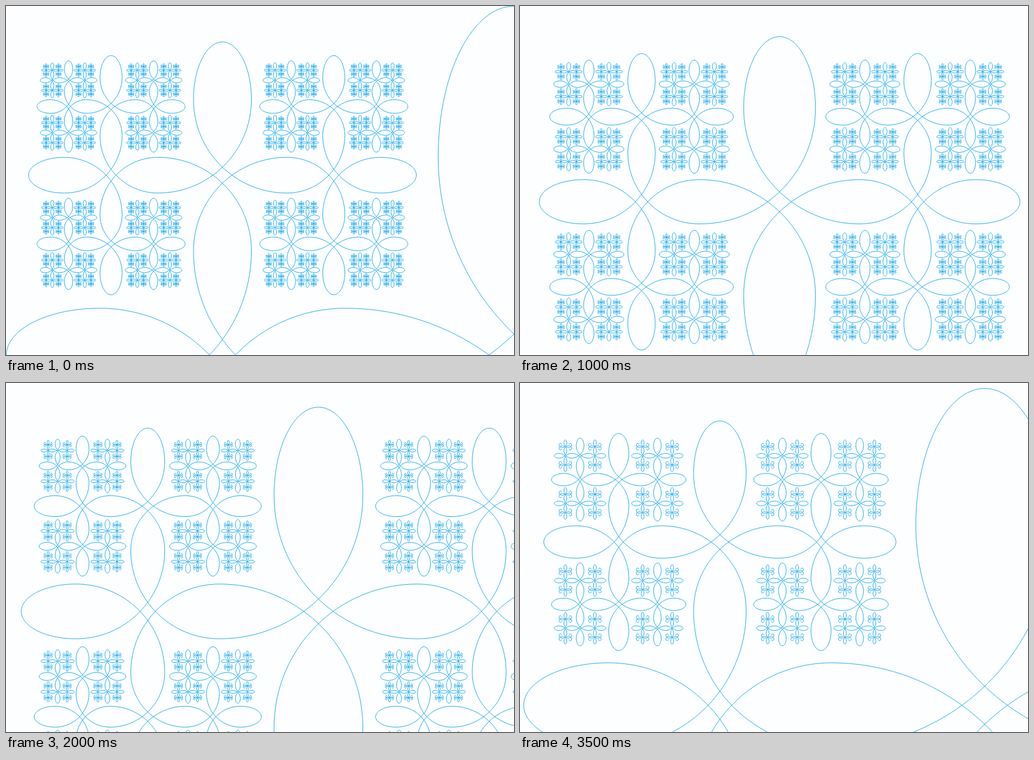
Animation, 902 px wide and 621 px high, one loop 3.75 s. Source, as an HTML page with a canvas:

```html
<!DOCTYPE html>
<html lang="en">
<head>
<meta charset="utf-8">
<title>Golden H-tree zoom</title>
<style>
  html, body { margin: 0; width: 100%; height: 100%; overflow: hidden; background: #fdfeff; }
  canvas { display: block; }
</style>
</head>
<body>
<canvas id="stage" width="902" height="621"></canvas>
<script>
const W = 902, H = 621;
const ctx = document.getElementById('stage').getContext('2d');

const PHI = (1 + Math.sqrt(5)) / 2;
const KAPPA = 0.5523;
const ROOT = { x: W, y: H, arm: 517.7 };
// The corner the branches converge on; the zoom keeps it in place.
const FOCUS = { x: ROOT.x - ROOT.arm * PHI, y: ROOT.y - ROOT.arm };
const DEPTH = 10;
const STEP = 250, STEPS = 15;

// Lobe proportions, relative to the arm length.
const WIDTH = 0.1607, INNER = 0.579, OUTER = 0.421, TIP = 0.741;

const tree = new Path2D();

// Quarter ellipses in a junction's own axes: u along its arms, v along its stem.
function pen(x, y, upright) {
  const at = (u, v) => upright ? [x + v, y + u] : [x + u, y + v];
  return (pu, pv, qu, qv) => {
    tree.moveTo(...at(pu, pv));
    tree.bezierCurveTo(
      ...at(pu + KAPPA * (qu - pu), pv),
      ...at(qu, qv + KAPPA * (pv - qv)),
      ...at(qu, qv));
  };
}

function junction(x, y, arm, upright, out, level) {
  if (x > W + 1 || y > H + 1) return;
  const quarter = pen(x, y, upright);
  const stem = arm * PHI;

  for (const s of [-1, 1]) {
    quarter(0, out * TIP * stem, s * WIDTH * stem, out * OUTER * stem);
    for (const t of [-1, 1]) {
      quarter(s * INNER * arm, -t * WIDTH * arm, -s * WIDTH * stem, t * OUTER * stem);
      if (level === DEPTH) curl(quarter, arm, s, t);
    }
    if (level < DEPTH) {
      junction(x + (upright ? 0 : s * arm), y + (upright ? s * arm : 0),
        arm / PHI, !upright, s, level + 1);
    }
  }
}

function curl(quarter, arm, s, t) {
  const u = s * arm, v = t * arm;
  quarter(INNER * u, -WIDTH * v, 1.12 * u, 0.36 * v);
  quarter(0.88 * u, 0.6 * v, 1.12 * u, 0.36 * v);
  quarter(0.88 * u, 0.6 * v, 0.66 * u, 0.38 * v);
}

// The visible span shrinks linearly; the opening step covers two units.
function zoomAt(time) {
  const k = Math.floor(time / STEP) % STEPS;
  return k ? 1 / (1 - (k + 1) / (STEPS + 1) / PHI) : 1;
}

function draw(zoom) {
  ctx.setTransform(1, 0, 0, 1, 0, 0);
  ctx.fillStyle = '#fdfeff';
  ctx.fillRect(0, 0, W, H);
  ctx.setTransform(zoom, 0, 0, zoom, FOCUS.x * (1 - zoom), FOCUS.y * (1 - zoom));
  ctx.strokeStyle = '#0ba4f0';
  ctx.lineWidth = 0.95 / zoom;
  ctx.stroke(tree);
}

junction(ROOT.x, ROOT.y, ROOT.arm, false, -1, 0);

const start = performance.now();
let shown = 0;
function tick() {
  const zoom = zoomAt(performance.now() - start);
  if (zoom !== shown) draw(shown = zoom);
  requestAnimationFrame(tick);
}
tick();
</script>
</body>
</html>
```
